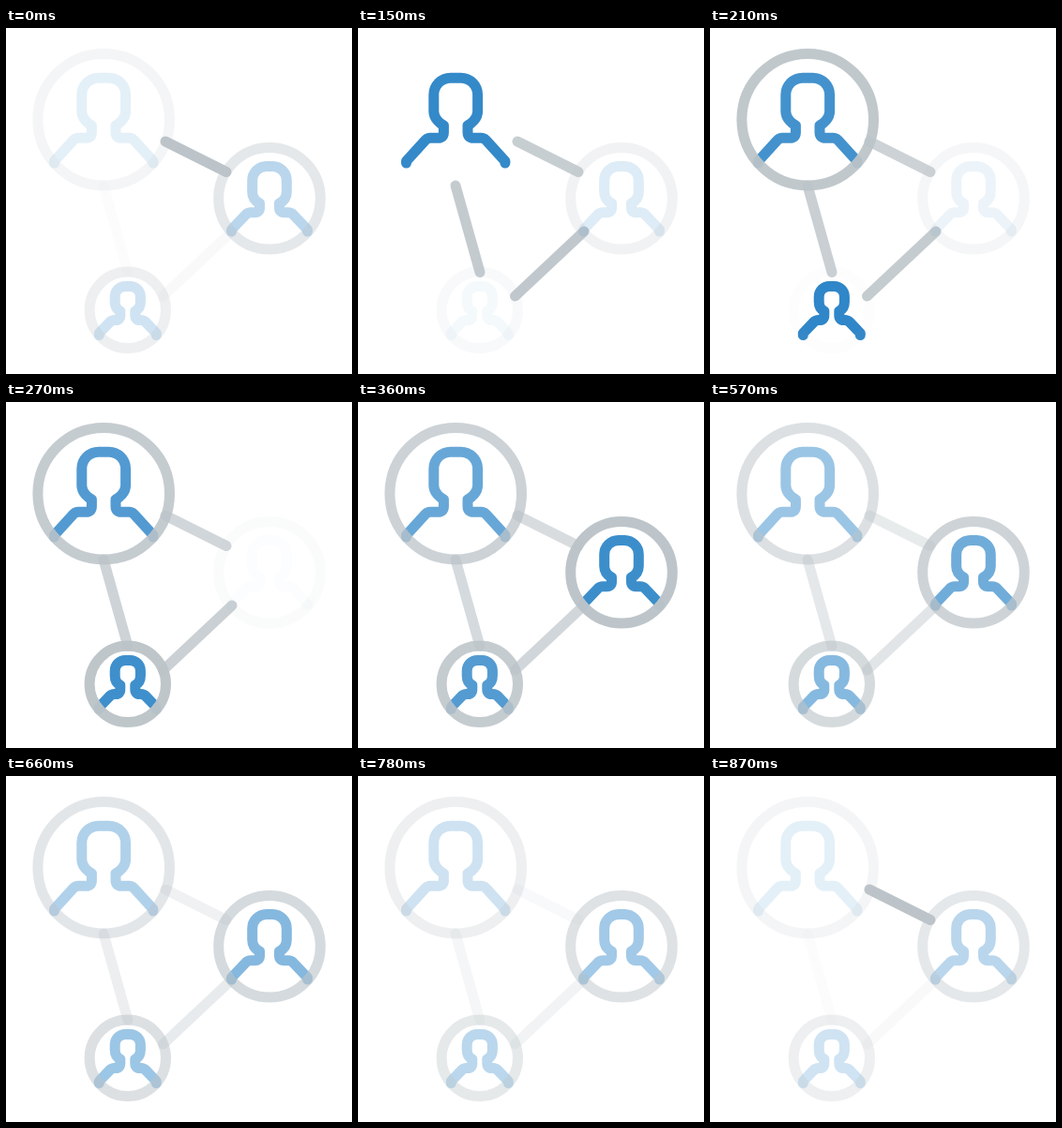
Animation, 369 px wide and 369 px high, one loop 900 ms. Source, as an HTML page:

```html
<!DOCTYPE html>
<html lang="en">
<head>
<meta charset="utf-8">
<title>Network loader</title>
<style>
  html, body { margin: 0; width: 100%; height: 100%; overflow: hidden; background: #fff; }
  svg { display: block; width: 100vw; height: 100vh; }
  path, circle { fill: none; stroke-width: 11; stroke-linecap: round; stroke-linejoin: round; }
  .gray { stroke: #bcc4c9; }
  .blue { stroke: #2b84c7; }
</style>
</head>
<body>
<svg id="stage" viewBox="0 0 369 369"></svg>
<script>
const STEP = 30, LOOP = 900, FADE = 870;
const stage = document.getElementById('stage');
const parts = [];

function add(tag, cls, start, attrs) {
  const el = document.createElementNS('http://www.w3.org/2000/svg', tag);
  el.setAttribute('class', cls);
  for (const key in attrs) el.setAttribute(key, attrs[key]);
  stage.appendChild(el);
  parts.push({ el, start });
}

const line = (start, d) => add('path', 'gray', start, { d });
const ring = (start, cx, cy, r) => add('circle', 'gray', start, { cx, cy, r });

// Each half of the bust runs from the crown down to the shoulder tip.
function person(start, p) {
  const half = s => {
    const x = v => p.cx + s * v;
    return `M${p.cx} ${p.top}H${x(p.head - p.r)}` +
      `A${p.r} ${p.r} 0 0 ${s > 0 ? 1 : 0} ${x(p.head)} ${p.top + p.r}V${p.jaw}` +
      `C${x(p.head)} ${(p.jaw + p.neckY) / 2} ${x(p.neck + 4)} ${p.neckY - 2} ${x(p.neck)} ${p.neckY}` +
      `V${p.base - p.fillet}Q${x(p.neck)} ${p.base} ${x(p.neck + p.fillet)} ${p.base}` +
      `H${x(p.bend - 3)}Q${x(p.bend)} ${p.base} ${x(p.bend + 2)} ${p.base + 2}` +
      `L${x(p.tip)} ${p.end - 2}V${p.end}`;
  };
  add('path', 'blue', start, { d: half(-1) + half(1) });
}

line(0, 'M170 121L235 153.5');
line(40, 'M104 168L130 260.5');
line(85, 'M241 217L167.5 286');

person(110, { cx: 104.2, top: 53.2, head: 23.4, r: 18, jaw: 89, neck: 12.8, neckY: 104,
  base: 117.3, fillet: 6, bend: 30, tip: 52.7, end: 144 });
person(193, { cx: 129.8, top: 275.5, head: 13.6, r: 11, jaw: 292, neck: 8, neckY: 302,
  base: 311.5, fillet: 5, bend: 17, tip: 30.5, end: 327.5 });
person(287, { cx: 281, top: 147.5, head: 18.3, r: 15, jaw: 175, neck: 10.5, neckY: 187,
  base: 196.7, fillet: 5, bend: 23, tip: 40.5, end: 217 });

ring(150, 104.2, 97.7, 70.3);
ring(240, 129.8, 300.8, 40.7);
ring(338, 281, 181.7, 54.3);

function draw(now) {
  const t = Math.floor(now % LOOP / STEP) * STEP;
  for (const { el, start } of parts) {
    const age = (t - start + 2 * FADE) % FADE;
    el.style.opacity = t === start && start ? 0 : 1 - age / FADE;
  }
}

const begin = performance.now();
function tick() {
  draw(performance.now() - begin);
  requestAnimationFrame(tick);
}
tick();
</script>
</body>
</html>
```
